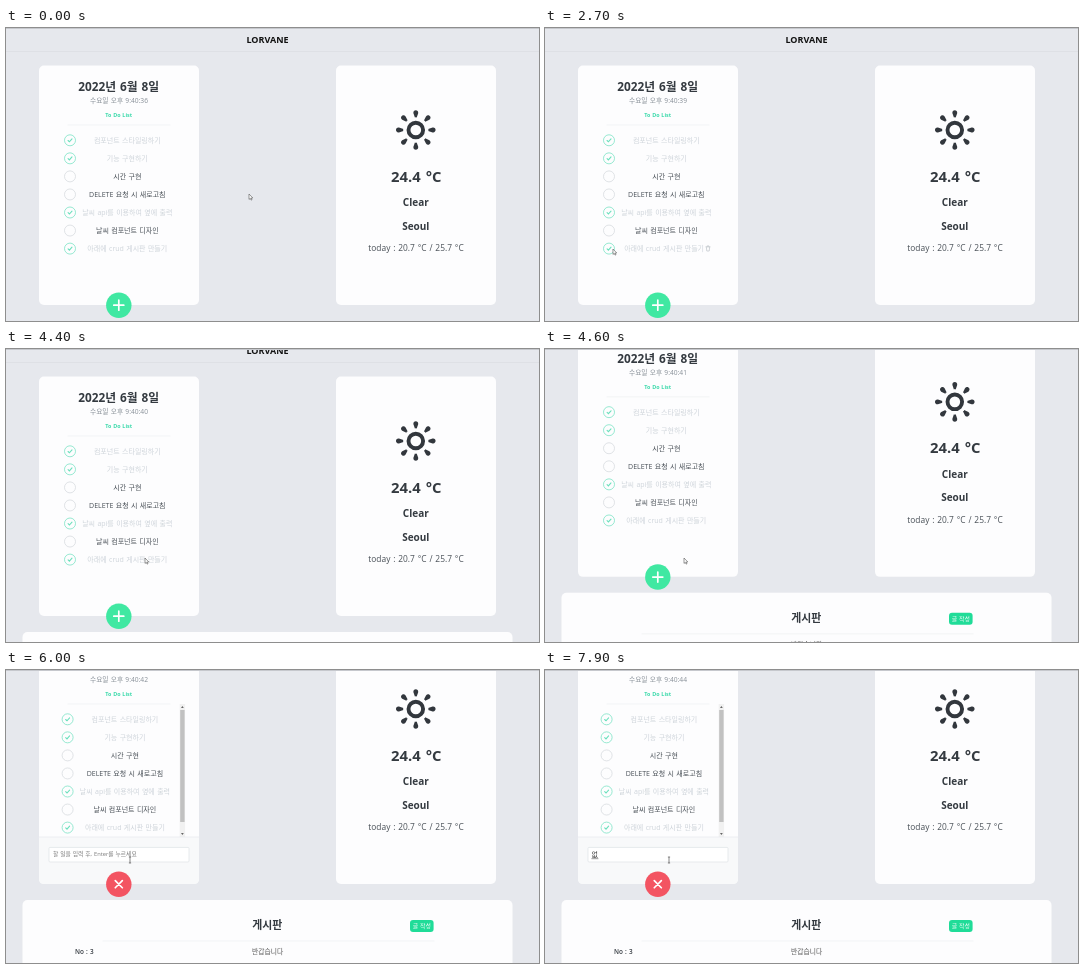
Recreate the animation shown at these times as an HTML page. Size 533 by 293 pixels, loop 8 s.

```html
<!DOCTYPE html>
<html lang="ko">
<head>
<meta charset="utf-8">
<title>To Do List</title>
<style>
  html, body { margin: 0; width: 100%; height: 100%; overflow: hidden; background: #e6e8ed; }
  svg { display: block; width: 533px; height: 293px; }
  text {
    font-family: "Open Sans", "Noto Sans CJK KR", "Noto Sans CJK", sans-serif;
    white-space: pre;
    word-spacing: .08em;
  }
</style>
</head>
<body>
<svg id="stage" viewBox="0 0 533 293">
  <defs>
    <clipPath id="listClip"><rect x="33" y="97" width="160" height="133"/></clipPath>
  </defs>
  <g id="page"></g>
  <path d="M0 .5H533" stroke="#c6c8cd"/>
  <g id="cursor">
    <path id="arrow" d="M0 0V5.4L1.3 4.3L2.1 6.1L3 5.7L2.2 4H3.8Z" fill="#fff" stroke="#555" stroke-width=".6"/>
    <path id="hand" d="M-.6 .4Q0 -.4 .7 .4V3L3.3 3.7V6.3L2.6 8H-.4L-2.2 5V4L-.6 4.8Z" fill="#fff" stroke="#333" stroke-width=".7"/>
    <path id="beam" d="M-1.1 -3H1.1M0 -3V3M-1.1 3H1.1" fill="none" stroke="#555" stroke-width=".7"/>
  </g>
</svg>
<script>
const LOOP = 8000;
const OPEN = 5200;
const MINT = '#38d9a9';
const SOFT_MINT = '#6be0bd';
const INK = '#343a40';
const byId = id => document.getElementById(id);

function add(parent, tag, attrs = {}, content) {
  const el = document.createElementNS('http://www.w3.org/2000/svg', tag);
  for (const key in attrs) el.setAttribute(key, attrs[key]);
  if (content) el.textContent = content;
  parent.append(el);
  return el;
}

function label(parent, content, x, y, size, fill, weight = 400, anchor = 'middle') {
  return add(parent, 'text', {
    x, y, fill, 'font-size': size, 'font-weight': weight, 'text-anchor': anchor
  }, content);
}

function box(parent, x, y, width, height, fill, rx = 0, stroke = 'none') {
  return add(parent, 'rect', { x, y, width, height, fill, rx, stroke, 'stroke-width': .7 });
}

function line(parent, d, stroke, width = .7) {
  return add(parent, 'path', { d, stroke, fill: 'none', 'stroke-width': width, 'stroke-linecap': 'round' });
}

const show = (el, on) => el.setAttribute('visibility', on ? 'visible' : 'hidden');
const move = (el, x, y) => el.setAttribute('transform', `translate(${x} ${y})`);

const page = byId('page');

// Header
line(page, 'M0 23.5H533', '#dbdde2');
label(page, 'LORVANE', 261.5, 15, 9, '#111', 700);

// To-do card
box(page, 33, 37.5, 160, 239.5, '#fdfdfe', 5);
label(page, '2022년 6월 8일', 112.7, 62.8, 11.8, INK, 700);
const clock = label(page, '', 113, 75, 6.7, '#868e96');
label(page, 'To Do List', 112.7, 89, 5.4, MINT, 700);
line(page, 'M62 97H164', '#e9ecef', .6);

const list = add(page, 'g');
const rows = add(list, 'g');
const items = [
  ['컴포넌트 스타일링하기', true],
  ['기능 구현하기', true],
  ['시간 구현', false],
  ['DELETE 요청 시 새로고침', false],
  ['날씨 api를 이용하여 옆에 출력', true],
  ['날씨 컴포넌트 디자인', false],
  ['아래에 crud 게시판 만들기', true]
].map(([name, done], i) => {
  const row = add(rows, 'g', { transform: `translate(0 ${112.3 + i * 18.05})` });
  const ring = add(row, 'circle', { cx: 64, cy: 0, r: 5.5, fill: 'none', 'stroke-width': .7 });
  const tick = line(row, 'M62.1 .2L63.4 1.5L66 -1.4', SOFT_MINT, 1.1);
  const words = label(row, name, 121.3, 2.6, 7, '');
  const item = { words, setDone(on) {
    ring.setAttribute('stroke', on ? SOFT_MINT : '#d3d7dc');
    words.setAttribute('fill', on ? '#ced4da' : '#495057');
    show(tick, on);
  } };
  item.setDone(done);
  return item;
});
const last = items[6];
const trash = line(rows, 'M160.9 218.8H165.1M162.1 218.8V217.9H163.9V218.8M161.4 219.4L161.8 223H164.2L164.6 219.4', '#c4c9ce', .8);

// Input form
const form = add(page, 'g');
box(form, 173.7, 97, 5.4, 133, '#f1f1f1');
box(form, 174.2, 103, 4.4, 112, '#c1c1c1');
add(form, 'path', { d: 'M175 101L176.4 99L177.8 101ZM175 226L176.4 228L177.8 226Z', fill: '#666' });
add(form, 'path', { d: 'M33 230H193V272Q193 277 188 277H38Q33 277 33 272Z', fill: '#f8f9fa' });
line(form, 'M33 230H193', '#e6e9ec');
box(form, 43, 240.4, 140, 14.6, '#fff', 1, '#dee2e6');
const hint = label(form, '할 일을 입력 후, Enter를 누르세요', 47, 249.4, 5.75, '#777', 400, 'start');
const typed = label(form, '', 46.5, 250.4, 7, '#333', 400, 'start');
const underline = line(form, 'M46.8 251.7H53', '#555', .6);
const caret = line(form, 'M46.6 244V251', '#333', .7);

// Round button
const button = add(page, 'circle', { cx: 112.8, cy: 277.2, r: 12.7 });
const plus = line(page, 'M-5 0H5M0 -5V5', '#fff', 1.7);

// Weather card
box(page, 330, 37.5, 160, 239.5, '#fdfdfe', 5);
const sun = add(page, 'g', { transform: 'translate(409.8 102)', fill: '#32373d' });
add(sun, 'circle', { r: 7.3, fill: 'none', stroke: '#32373d', 'stroke-width': 3.9 });
for (let a = 0; a < 360; a += 45) {
  add(sun, 'path', {
    d: 'M-.9 -12.4Q0 -13.2 .9 -12.4L2.4 -16.8C3 -20.8 -3 -20.8 -2.4 -16.8Z',
    transform: `rotate(${a})`
  });
}
label(page, '24.4 °C', 410.3, 153.6, 14.8, INK, 700);
label(page, 'Clear', 409.8, 177.8, 10, INK, 700);
label(page, 'Seoul', 409.8, 201.5, 10, INK, 700);
label(page, 'today : 20.7 °C / 25.7 °C', 410, 223.2, 8.4, '#495057');

// Board
box(page, 16.5, 293, 490, 120, '#fdfdfe', 5);
label(page, '게시판', 261.3, 322.4, 10.9, INK, 700);
box(page, 404, 313, 23.6, 12, '#20dc98', 3);
label(page, '글 작성', 415.8, 321.2, 5.9, '#fff');
line(page, 'M97 334H428', '#e9ecef', .6);
label(page, 'No : 3', 69, 347, 6.4, INK, 600, 'start');
label(page, '반갑습니다', 261.6, 347.2, 6.8, '#555');

// Steps: [time, ...values]
const path = [
  [0, 243, 166], [350, 243, 166], [900, 150, 148], [1200, 120, 252], [1500, 132.5, 231],
  [1900, 124, 222], [2700, 68, 221], [2850, 61, 222.5], [3750, 61, 222.5],
  [4250, 139, 209], [4850, 139, 209], [5100, 115.5, 214], [5450, 115.5, 214],
  [5800, 124, 190], [LOOP, 124, 190]
];
const scrollSteps = [[0, 0], [4350, 0], [4600, 49], [4700, 63], [LOOP, 63]];
const colors = [
  [0, 64, 232, 162], [5050, 64, 232, 162], [5150, 88, 235, 178], [OPEN, 88, 235, 178],
  [5330, 250, 116, 124], [5500, 250, 116, 124], [5620, 243, 84, 98], [LOOP, 243, 84, 98]
];
const keys = [[7500, 'ㅇ'], [7600, '어'], [7700, '업'], [7800, '없']];

function at(steps, t) {
  const i = Math.max(1, steps.findIndex(s => s[0] >= t));
  const a = steps[i - 1], b = steps[i];
  const k = (t - a[0]) / (b[0] - a[0]);
  return a.slice(1).map((v, n) => v + (b[n + 1] - v) * k);
}

function render(t) {
  const [scroll] = at(scrollSteps, t);
  const [x, y] = at(path, t);
  const open = t >= OPEN;
  move(page, 0, -scroll);
  clock.textContent = `수요일 오후 9:40:${36 + Math.floor((t + 450) / 1000)}`;

  const hover = t >= 1850 && t < 3850;
  last.setDone(t < 3000 || t >= 3750);
  last.words.setAttribute('x', hover ? 119.1 : 121.3);
  show(trash, hover);

  move(rows, open ? -2.4 : 0, 0);
  if (open) list.setAttribute('clip-path', 'url(#listClip)');
  else list.removeAttribute('clip-path');
  form.setAttribute('display', open ? 'inline' : 'none');

  const key = keys.filter(k => t >= k[0]).pop();
  typed.textContent = key ? key[1] : '';
  hint.setAttribute('display', key ? 'none' : 'inline');
  underline.setAttribute('display', key ? 'inline' : 'none');
  caret.setAttribute('display', !key && (t - OPEN) % 1000 < 500 ? 'inline' : 'none');

  button.setAttribute('fill', `rgb(${at(colors, t).map(Math.round)})`);
  const turn = 45 * Math.min(1, Math.max(0, (t - OPEN) / 130));
  plus.setAttribute('transform', `translate(112.8 277.2) rotate(${turn})`);

  move(byId('cursor'), x, y);
  const kind = t >= 5650 ? 'beam'
    : (t >= 2780 && t < 3800) || (t >= 5030 && t < 5560) ? 'hand' : 'arrow';
  for (const id of ['arrow', 'hand', 'beam']) show(byId(id), id === kind);
}

const start = performance.now();
function tick() {
  render((performance.now() - start) % LOOP);
  requestAnimationFrame(tick);
}
tick();
</script>
</body>
</html>
```
